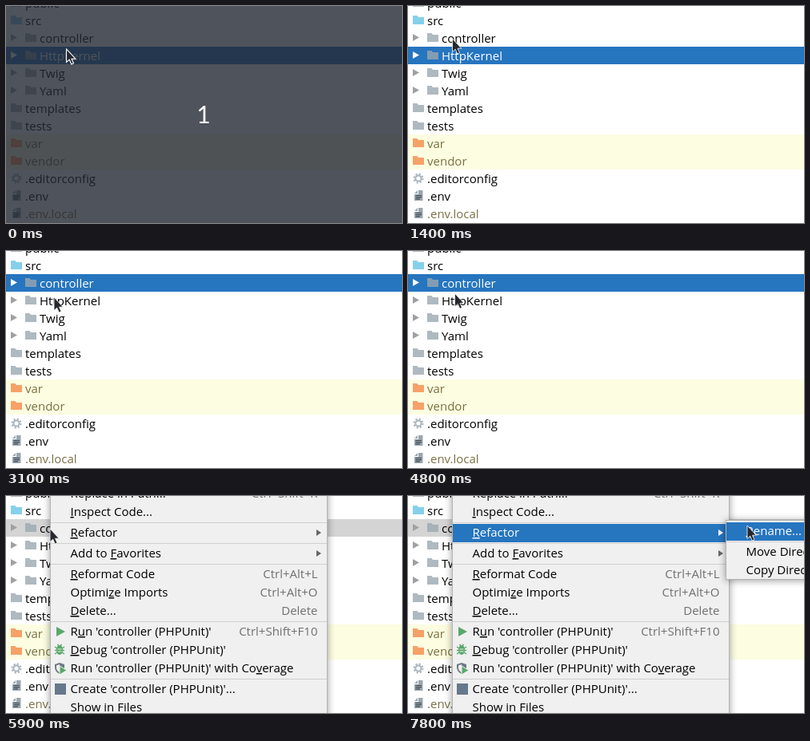
An HTML page for the animation above (8 s loop, 495x272 px).

```html
<!DOCTYPE html>
<html lang="en">
<head>
<meta charset="utf-8">
<title>Rename a directory</title>
<style>
  html, body { margin: 0; height: 100%; overflow: hidden; background: #fff; }
  svg { display: block; width: 495px; height: 272px; font: 15px "Open Sans", sans-serif; }
  .box { fill: #f0f0f0; stroke: #b4b4b4; filter: drop-shadow(0 1px 5px #0006); }
  .key { text-decoration: underline; }
  .count { font: 30px Lato, sans-serif; text-anchor: middle; }
</style>
</head>
<body>
<svg id="stage" viewBox="0 0 495 272"></svg>
<script>
const stage = document.getElementById('stage');
const LOOP = 8000, TICK = 100, ROW = 22, ITEM = 23, GAP = 3;
const BLUE = '#2675bf', GREY = '#9aa7b0', OLIVE = '#7a7043', GREEN = '#59a869';

// Pointer moves: start, duration, end x, end y
const moves = [
  [0, 1, 75.5, 54], [400, 200, 97, 55.5], [700, 200, 73.5, 54], [1100, 300, 55.5, 41],
  [2000, 300, 60, 58], [4700, 400, 54, 39], [5200, 100, 55, 41], [6100, 400, 59, 49],
  [6700, 100, 107.5, 57], [6800, 800, 415, 36], [7600, 200, 424, 37]
];

// Tree rows; a leading slash marks a child folder
const rows = ['public', 'src', '/controller', '/HttpKernel', '/Twig', '/Yaml', 'templates',
  'tests', 'var', 'vendor', '.editorconfig', '.env', '.env.local'];

// Menu groups; _ marks the mnemonic, | the shortcut, > opens a submenu
const mainGroups = [
  ['Replace in Path...|Ctrl+Shift+R', '_Inspect Code...'],
  ['_Refactor|>'],
  ['Add to _Favorites|>'],
  ['_Reformat Code|Ctrl+Alt+L', 'Optimi_ze Imports|Ctrl+Alt+O', '_Delete...|Delete'],
  ["R_un 'controller (PHPUnit)'|Ctrl+Shift+F10", "_Debug 'controller (PHPUnit)'",
    "Run 'controller (PHPUnit)' with Co_verage"],
  ["Create 'controller (PHPUnit)'...", 'Show in Files']
];
const subGroups = [['_Rename...'], ['Move Directory...', 'Copy Directory...']];

const rect = (x, y, w, h, fill) => `<rect x="${x}" y="${y}" width="${w}" height="${h}" fill="${fill}"/>`;
const path = (d, fill, more = '') => `<path d="${d}" fill="${fill}" ${more}/>`;
const at = (x, y, inner) => `<g transform="translate(${x} ${y})">${inner}</g>`;
const arrow = (x, y, w, h, fill) => path(`M${x} ${y - h}l${w} ${h}l${-w} ${h}Z`, fill);
const text = (x, y, s, fill = '#000', more = '') =>
  `<text x="${x}" y="${y}" fill="${fill}" ${more}>${s.replace(/_(.)/, '<tspan class="key">$1</tspan>')}</text>`;

const folder = fill => path('M1 13h14V4H8L6.7 2.3Q6.2 2 5.8 2H1Z', fill, 'opacity=".8"');
const gear = `<g fill="none" stroke="${GREY}" opacity=".85"><circle cx="8" cy="8" r="3.6" stroke-width="2"/>` +
  '<circle cx="8" cy="8" r="5.5" stroke-width="2" stroke-dasharray="2.2 2.12"/></g>';
const file = path('M7 1V5H3Z M8 1h5.5v13H3V6h5Z', GREY) +
  path('M4.5 7.5h7.5M4.5 9.7h7.5M4.5 11.9h5.5', 'none', 'stroke="#3f4a52" stroke-width="1.2"');
const bug = path('M1 4l3 2M1 8.5h3M1 13l3-2M13 4l-3 2M13 8.5h-3M13 13l-3-2M4.5 1l1.5 2M9.5 1L8 3',
  'none', `stroke="${GREEN}" stroke-width="1.5"`) +
  `<ellipse cx="7" cy="8" rx="4" ry="6" fill="${GREEN}"/>` + path('M4.5 7h5M4.5 10h5', 'none', 'stroke="#f0f0f0"');
const shield = path('M0 2L6 0L12 2V6Q12 11 6 14Q0 11 0 6Z', '#6e7b84') +
  path('M6 2V12Q2 10 2 6V3.4Z', '#f0f0f0') + path('M6 4L15 9.5L6 15Z', GREEN, 'stroke="#f0f0f0"');

function icon(name) {
  if (name === '.editorconfig') return gear;
  if (name.startsWith('.env')) return file;
  return folder(name === 'src' ? '#68c4e5' : name[0] === 'v' ? '#f48a4a' : GREY);
}

function tree(selected, focused) {
  let out = rect(0, 161, 495, 2 * ROW, '#fcfde1');
  rows.forEach((row, i) => {
    const name = row.replace('/', ''), child = name !== row;
    const y = i * ROW - 4, x = child ? 23 : 5, on = name === selected, lit = on && focused;
    if (on) out += rect(0, y - 11, 495, ROW, focused ? BLUE : '#d4d4d4');
    if (child) out += arrow(6, y - .5, 8, 4.5, lit ? '#fff' : '#a0a0a0');
    out += at(x, y - 8, icon(name)) +
      text(x + 19, y + 6, name, lit ? '#fff' : /^v|local/.test(name) ? OLIVE : '#000');
  });
  return out;
}

// Stacks the groups downwards from the centre line y, with a rule between them
function menu(x, y, w, groups, active) {
  let out = '';
  groups.forEach((group, i) => {
    if (i) out += rect(x, y - 13, w, 1, '#cfcfcf');
    for (const item of group) {
      const [label, key] = item.split('|'), lit = active && label === active;
      if (lit) out += rect(x, y - 11, w, ITEM, BLUE);
      out += text(x + 24.5, y + 5, label, lit ? '#fff' : '#000');
      if (key === '>') out += arrow(x + w - 13, y, 6, 4, lit ? '#fff' : '#666');
      else if (key) out += text(x + w - 11.5, y + 5, key, '#707070', 'text-anchor="end"');
      y += ITEM;
    }
    y += GAP;
  });
  return out;
}

function mainMenu(active) {
  return '<rect class="box" x="55.5" y="-20" width="346" height="320"/>' +
    menu(56, -3, 345, mainGroups, active) + arrow(63, 170, 11, 6, GREEN) +
    at(60, 185, bug) + at(61, 209, shield) + rect(61, 235, 14, 14, '#66788c');
}

function subMenu(active) {
  return '<rect class="box" x="397.5" y="30.5" width="130" height="74"/>' + menu(398, 44, 130, subGroups, active);
}

function pointer(t) {
  let x = 0, y = 0;
  for (const [start, time, endX, endY] of moves) {
    const k = Math.min(1, Math.max(0, (t - start) / time));
    x += (endX - x) * k;
    y += (endY - y) * k;
  }
  return [x, y];
}

function scene(t) {
  const [x, y] = t ? pointer(t) : pointer(1), open = t >= 5700, dim = t < 200;
  let out = tree(t < 1800 ? 'HttpKernel' : 'controller', !open);
  if (open) out += mainMenu(t >= 6200 && '_Refactor');
  if (t >= 6300) out += subMenu(x >= 398 && '_Rename...');
  if (dim) out += rect(0, 0, 495, 272, 'rgba(35,40,50,.8)') + text(247, 147, '1', '#fff', 'class="count"');
  return out + at(x, y, path('M0 0V16.5L3.7 13.2L6.3 19L9 17.8L6.5 12.2H11.3Z', '#25282c',
    `stroke="#fff" stroke-width="${dim ? 1.1 : .8}"`));
}

let shown = -1;
function draw(now) {
  const t = Math.floor(now % LOOP / TICK) * TICK;
  if (t !== shown) stage.innerHTML = scene(shown = t);
  requestAnimationFrame(draw);
}
draw(performance.now());
</script>
</body>
</html>
```
